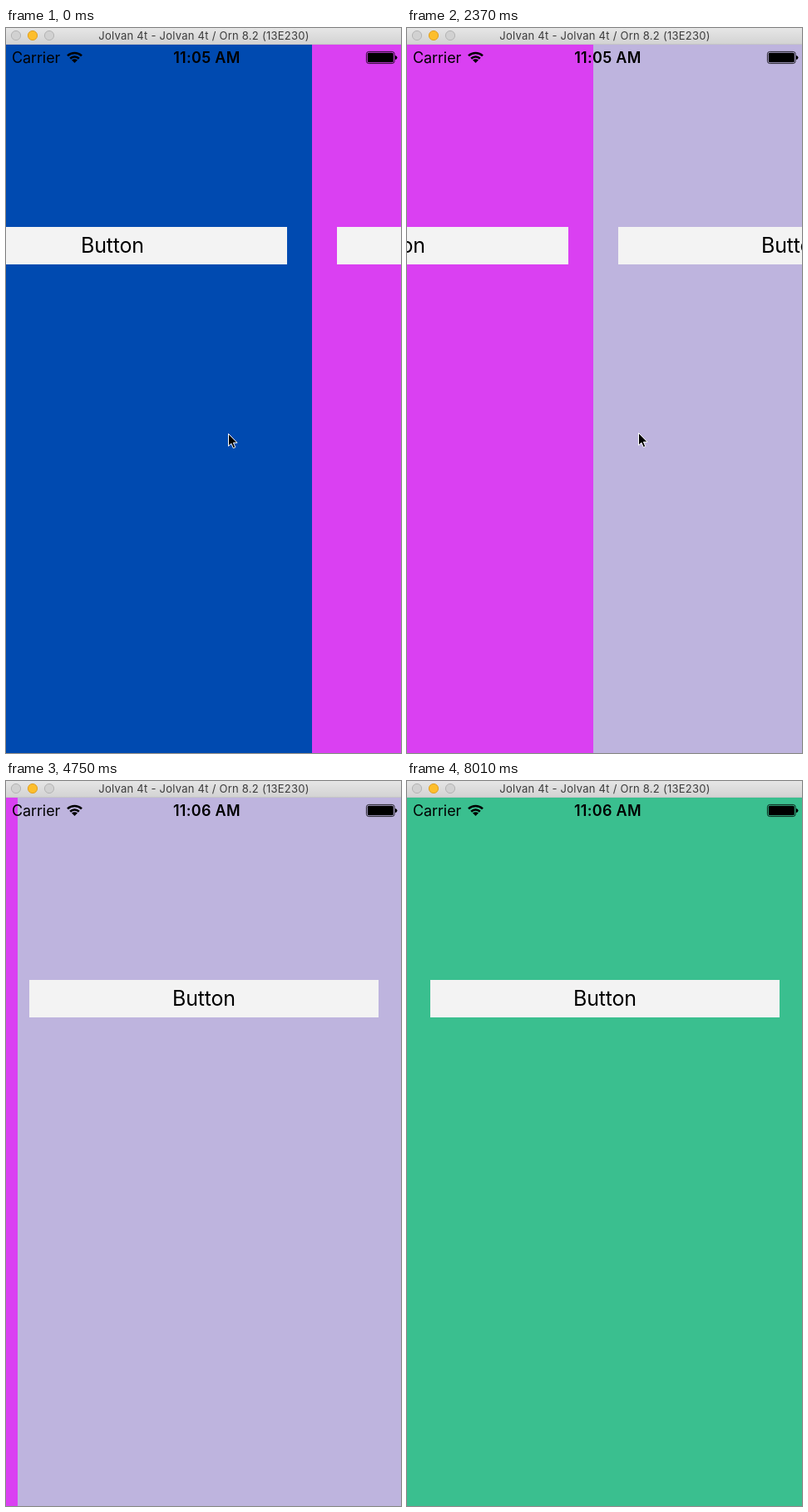
Animation, 475 px wide and 871 px high, one loop 8.6 s. Source, as an HTML page:

```html
<!DOCTYPE html>
<html lang="en">
<head>
<meta charset="utf-8">
<title>Colour pager</title>
<style>
  html, body { margin: 0; width: 100%; height: 100%; overflow: hidden; }
  svg { display: block; width: 100%; height: 100%; }
  text { font-family: Inter, Roboto, sans-serif; }
</style>
</head>
<body>
<svg viewBox="0 0 475 871" xmlns="http://www.w3.org/2000/svg">
  <defs>
    <linearGradient id="bar" x1="0" y1="0" x2="0" y2="1">
      <stop offset="0" stop-color="#e6e6e6"/>
      <stop offset="1" stop-color="#d2d2d2"/>
    </linearGradient>
  </defs>

  <g id="pages"></g>

  <g id="status">
    <text x="7" y="42" font-size="18" letter-spacing="-.1">Carrier</text>
    <g fill="none" stroke="#000" stroke-width="2.6">
      <path d="M74 33.4A12.4 12.4 0 0 1 91 33.4"/>
      <path d="M77.2 36.7A7.6 7.6 0 0 1 87.8 36.7"/>
    </g>
    <path d="M82.5 42L79 38.6A5 5 0 0 1 86 38.6Z"/>
    <text id="clock" x="241.4" y="42" font-size="18" font-weight="600" letter-spacing=".3" text-anchor="middle"></text>
    <rect x="433.4" y="28.4" width="33.8" height="14.2" rx="3" fill="none" stroke="#000" stroke-width=".8"/>
    <rect x="434.8" y="29.8" width="31" height="11.4" rx="1.5"/>
    <path d="M468 33Q470.5 33.5 470.5 35.5T468 38Z"/>
  </g>

  <g id="titlebar">
    <rect width="475" height="20" fill="url(#bar)"/>
    <rect y="19" width="475" height="1" fill="#c6c6c6"/>
    <g fill="#d1d1d1" stroke="#b4b4b4">
      <circle cx="12" cy="9" r="5.6"/>
      <circle cx="32" cy="9" r="5.6" fill="#fdbe2c" stroke="#dfa023"/>
      <circle cx="52" cy="9" r="5.6"/>
    </g>
    <text x="238" y="14" font-size="13" letter-spacing=".25" fill="#3c3c3c" text-anchor="middle">Jolvan 4t - Jolvan 4t / Orn 8.2 (13E230)</text>
  </g>

  <path id="cursor" d="M.5 .5V15.3L3.9 12.2L6.3 17.7L8.8 16.6L6.4 11.3H11Z" stroke="#fff" stroke-linejoin="round"/>
</svg>

<script>
const LOOP = 8600, STEPS = 58, TICK = LOOP / STEPS;
const PAGE = 480, INSET = -2;
const COLORS = ['#004ab0', '#da40f2', '#beb4de', '#be0c2e', '#3abf8f'];

// each swipe advances one page
const SWIPES = [
  { start: -279, length: 900 },
  { start: 1850, length: 1000 },
  { start: 5692, length: 540 },
  { start: 6826, length: 900 }
];

// a drag back that is cancelled; the page it uncovers stays stuck at the left edge
const PEEK = { page: 1, start: 3400, length: 1250, reach: 190, until: 6220 };
const STUCK_X = 14 - PAGE;

// turning points of the pointer: time, x, y
const POINTER = [
  [0, 267, 487], [300, 110, 487], [1330, 464, 490], [1480, 404, 490], [1780, 400, 490],
  [2970, 154, 481], [4030, 335, 495], [4600, -30, 508], [4900, -30, 512],
  [5500, 250, 514], [5930, 51, 514], [6380, 404, 514], [6670, 404, 514],
  [7120, 257, 514], [7710, 200, 540], [8010, 480, 880]
];

const byId = id => document.getElementById(id);
const pagesEl = byId('pages'), clock = byId('clock'), cursor = byId('cursor');

const pages = COLORS.map(color => {
  const g = document.createElementNS('http://www.w3.org/2000/svg', 'g');
  g.innerHTML = `<rect y="19" width="${PAGE}" height="853" fill="${color}"/>
    <rect x="30" y="239" width="420" height="45" fill="#f3f3f3"/>
    <text x="240" y="270" font-size="25" letter-spacing="-.2" text-anchor="middle">Button</text>`;
  pagesEl.append(g);
  return g;
});
pagesEl.append(pages[PEEK.page]);

const progress = (t, { start, length }) => Math.min(1, Math.max(0, (t - start) / length));
const smooth = u => u * u * (3 - 2 * u);

function scrollAt(t) {
  const swiped = SWIPES.reduce((sum, swipe) => sum + PAGE * smooth(progress(t, swipe)), 0);
  return swiped - PEEK.reach * Math.sin(Math.PI * progress(t, PEEK)) ** 2;
}

function pointerAt(t) {
  const next = POINTER.findIndex(point => point[0] > t);
  if (next < 0) return POINTER[POINTER.length - 1].slice(1);
  const [t0, x0, y0] = POINTER[next - 1], [t1, x1, y1] = POINTER[next];
  const u = (t - t0) / (t1 - t0);
  return [x0 + (x1 - x0) * u, y0 + (y1 - y0) * u];
}

const move = (el, x, y) =>
  el.setAttribute('transform', `translate(${Math.round(x)} ${Math.round(y)})`);

function draw(ms) {
  const tick = Math.min(STEPS - 1, Math.floor((ms % LOOP + 6) / TICK));
  const t = Math.round(tick * TICK / 10) * 10;

  const scroll = scrollAt(t);
  const stuck = t > PEEK.start + PEEK.length / 2 && t < PEEK.until;
  pages.forEach((page, i) => {
    const x = INSET + i * PAGE - scroll;
    move(page, stuck && i === PEEK.page ? Math.max(x, STUCK_X) : x, 0);
  });

  clock.textContent = t < 4010 ? '11:05 AM' : '11:06 AM';
  move(cursor, ...pointerAt(t));
}

const start = performance.now();
function frame() {
  draw(performance.now() - start);
  requestAnimationFrame(frame);
}
frame();
</script>
</body>
</html>
```
